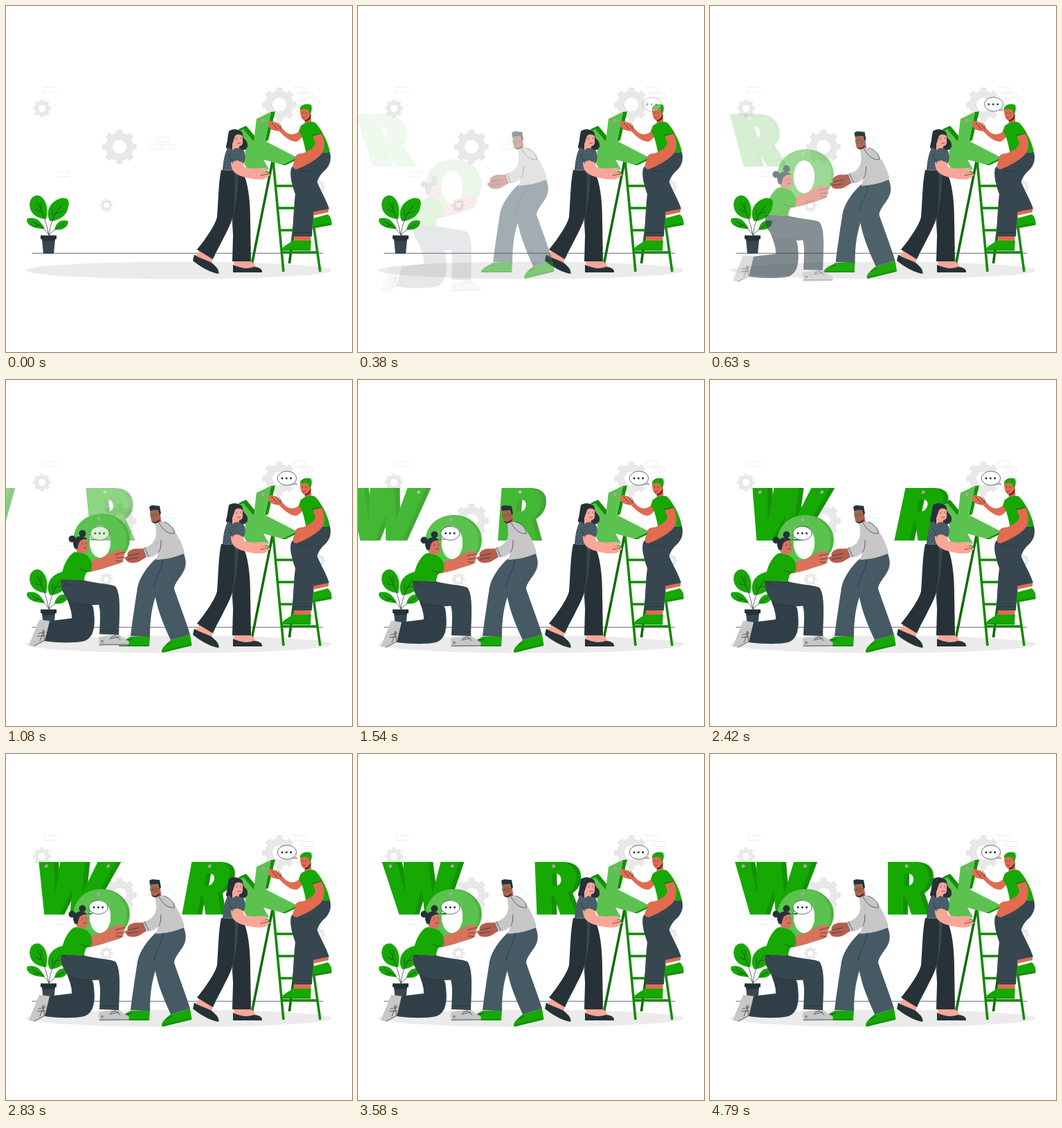
These frames come from a looping animation (500x500 px, 4830 ms). An HTML page:

```html
<!DOCTYPE html>
<html lang="en">
<head>
<meta charset="utf-8">
<title>Team building a word</title>
<style>
  html, body { margin: 0; width: 100%; height: 100%; overflow: hidden; background: #fff; }
  svg { display: block; width: 100vw; height: 100vh; }
  .green { fill: #16a803; } .deep { fill: #139204; } .light { fill: #5bc24f; }
  .ink { fill: #263238; } .slate { fill: #37474f; } .steel { fill: #455a64; }
  .grey { fill: #c7c7c7; } .bolt { fill: #a6a6a6; }
  .rose { fill: #f9a698; } .clay { fill: #e06b50; } .brown { fill: #b25f50; } .tan { fill: #d9725c; }
  .line { fill: none; stroke: #263238; stroke-width: .7; stroke-linecap: round; }
  .rail { fill: none; stroke: #148a08; stroke-width: 3.6; }
  .bubble { fill: #fff; stroke: #263238; stroke-width: .7; }
</style>
</head>
<body>
<svg viewBox="0 0 500 500">
  <defs>
    <pattern id="dots" width="5" height="6" patternUnits="userSpaceOnUse">
      <circle cx="1" cy="1.5" r=".45" fill="#aab8bf"/><circle cx="3.5" cy="4.5" r=".45" fill="#aab8bf"/>
    </pattern>
    <path id="w" d="M36 156H58L68 203 67 156H103L107 203 121 156H148L119 232H95L92 195 80 232H58Z"/>
    <path id="r" fill-rule="evenodd" d="M257 156H290C308 156 317 164 316 180 315 190 309 197 303 201L314 232H291L282 205H279V232H257ZM281 173V190H287C296 190 297 173 287 173Z"/>
    <path id="top" d="M322 204C317 208 314 222 313 237L331 238 341 229C347 226 347 213 343 208L333 205 327 208Z"/>
    <path id="hole" d="M136 211a15.500 24 0 0 0 0 48a15.500 24 0 0 0 0 -48Z"/>
  </defs>

  <g id="bricks" fill="none" stroke="#efefef"></g>
  <g id="gears" fill="none" stroke="#e8e8e8"></g>
  <ellipse cx="250" cy="382" rx="221" ry="12.5" fill="#ebebeb"/>
  <path class="line" d="M38 357.300H458"/>

  <g id="plant">
    <g class="green">
      <path d="M58 308C61 296 60 280 48 274 37 272 32 283 35 293 38 303 48 307 58 308Z"/>
      <path d="M64 311C57 301 61 285 76 279 88 275 93 280 90 290 88 304 76 310 64 311Z"/>
      <path d="M56 322C50 311 44 304 31 307 28 311 32 322 56 322Z"/>
      <path d="M70 323C72 313 80 307 90 311 90 319 82 325 70 323Z"/>
    </g>
    <path class="line" d="M62 331Q57 305 45 283M62 331Q65 305 80 288M62 331Q56 319 38 312M62 331Q70 322 84 315M53 298L43 294M51 293V284M67 304V295M70 300L82 297M48 317L40 318"/>
    <path class="ink" d="M50 331.500H73V337H50Z"/>
    <path class="slate" d="M52 337H71L69 358H54Z"/>
    <path class="ink" d="M52 336H71L70.500 339.500H52.500Z"/>
  </g>

  <g class="letter"><use href="#w" x="7" class="deep"/><use href="#w" class="green"/>
    <circle class="bolt" cx="48" cy="162" r="2.500"/><circle class="bolt" cx="137.500" cy="162" r="2.500"/></g>
  <g class="letter"><use href="#r" x="7" class="deep"/><use href="#r" class="green"/>
    <circle class="bolt" cx="284" cy="162" r="2.500"/></g>

  <g id="ladder">
    <path class="rail" style="stroke:#0c6d02" d="M385 225L355.500 372M428 228L409.500 372"/>
    <path class="rail" d="M389 260H420M392 292H424M396 324H440M398 356H449M386 223L401 384M432 228L454 384"/>
  </g>

  <g id="x">
    <path class="deep" d="M383 153L389 152.500 379 194 374 196ZM336 178L347 173 361 190 358 200ZM421 218V222L404 230 398 230ZM352 234H372L381 241H352Z"/>
    <path class="light" d="M362 163L383 153 374 195 421 219 400 229.500 372 222 380 236 352 240 344 228 346 210 338 180 343 178 358 196Z"/>
    <circle class="bolt" cx="371.500" cy="165.500" r="2.500"/>
  </g>

  <g id="woman">
    <path class="rose" d="M280 353L299 364 297 373 274 361ZM329 368H354L362 378H330Z"/>
    <path class="ink" d="M272 359.500C279 364 290 367 297 371 303 376 308 380 307.500 387 297 386 279 376 270 368ZM328 374C338 379 350 380 358 377 365 377 371 380 370 385H328Z"/>
    <path class="slate" d="M322 238L341 237 345 260 334 320 328 330Z"/>
    <path class="ink" d="M311 237L330 238C331 262 331 300 325 313 318 330 306 350 299 366L276 352C290 335 303 315 305 305 307 280 307 255 311 237Z"/>
    <path class="ink" d="M336 237H341C350 255 353 280 353 310L354 369H327L329 300C333 285 336 260 336 237Z"/>
    <path class="ink" d="M322 181C328 176 339 178 342 187 343 193 349 194 349 200 350 205 346 209 341 208 335 210 326 211 320 207 316 204 320 198 320 193Z"/>
    <path class="rose" d="M327 198H336L337 206 327 210Z"/>
    <path class="rose" d="M327 188C330 182 340 183 342 189L342 199C339 205 331 203 328 200Z"/>
    <path class="ink" d="M321 191C320 180 328 177 336 179 341 181 343 184 342 188 337 184 331 185 330 191L327 199C326 206 319 208 318 203 319 200 322 196 321 191Z"/>
    <path class="line" d="M333.500 191V192.500M339 190.500V192M335 198.500L339 198"/>
    <path class="rose" d="M345 233C358 236 366 234 376 234L377 239C366 243 354 241 344 238Z"/>
    <use href="#top" class="steel"/><use href="#top" fill="url(#dots)"/>
    <path class="rose" d="M325 226C325 237 330 243 343 247 355 250 365 252 374 250L382 244 378 240 364 241C352 241 344 236 342 226L334 223Z"/>
    <path class="line" d="M322 215L328 227M368 245L381 242"/>
  </g>

  <g id="climber">
    <path class="clay" d="M442 297L466 291V298L443 303Z"/>
    <path class="slate" d="M447 248C452 262 462 278 467 293L442 298 443 262Z"/>
    <path class="green" d="M443 307L465 301C471 306 471 313 470 316L443 321Z"/>
    <path class="deep" d="M443 318L470.500 313V316.500L443 321.500Z"/>
    <path class="clay" d="M416 331H440.500V340H416Z"/>
    <path class="green" d="M399 351C400 347 410 343 414 339L441 339 440 353H399Z"/>
    <path class="deep" d="M398.500 351.500H440.500V353.500H398.500Z"/>
    <path class="slate" d="M434 213L468 211C471 222 468 232 458 240 452 246 448 256 446 268L442 333H414C415 310 416 290 418 272 412 255 409 240 413 233 422 226 430 222 434 213Z"/>
    <path class="line" d="M444 238Q428 242 424 236M415 327.500H442"/>
    <path class="clay" d="M428 177C420 186 412 188 404 182L394 171C386 166 380 164 379 170 378 176 384 180 395 181 403 190 413 197 420 196 427 193 430 186 431 181Z"/>
    <path class="clay" d="M431 160L441 156V170L432 173Z"/>
    <path class="green" d="M426 173C432 168 440 166 446 168 456 177 466 198 468 211L434 214C431 200 429 188 423 181Z"/>
    <path class="clay" d="M443 186L456 184C462 198 462 208 453 217 445 224 433 231 420 236 412 235 414 229 418 222 417 217 420 213 428 213 438 210 446 204 447 198Z"/>
    <path class="green" d="M440 171C447 167 453 176 457 184L443 188Z"/>
    <path class="clay" d="M425 149L439 147 441 159C440 166 434 168 430 165 426 162 425 156 425 149Z"/>
    <path class="ink" d="M432 165C436 164 438 162 439 159L440.500 158C440 164 437 167 432 166.500Z"/>
    <path class="green" d="M425 150C424 143 434 140 441 143 443 149 441 154 439 157L437 150C433 148 429 149 425 150Z"/>
    <path class="line" d="M428.500 154V155.500M433.500 154V155.500M429 161L432 161M443 187L456 184M390 168L396 176M384 169L392 178M393 168L398 174 396 178"/>
  </g>

  <g id="hoodie">
    <path class="green" d="M163 383C166 377 174 375 180 371L208 370 207 385H163ZM225 391C226 386 232 381 238 376L266 368 268.500 383 226 394Z"/>
    <path class="deep" d="M163 383H207V385H163ZM225 391L268 381V384L226 394Z"/>
    <path class="steel" d="M217 258C205 268 193 285 190 300 187 320 183 345 180 370L208 371C208 345 211 325 219 305L245 275Z"/>
    <path class="steel" d="M217 258L257 251C262 265 260 273 252 284 246 292 243 297 243 302 251 325 260 348 266 368L238 376C226 350 216 325 214 300 213 285 216 270 217 258Z"/>
    <path class="line" d="M227 260C225 275 216 284 214 298M174 376L182 375M232 383L240 379"/>
    <path class="brown" d="M204 241C195 246 187 242 182 245 177 247 174 251 176 254L171 257 176 263C182 265 190 265 196 260L206 254Z"/>
    <path class="line" d="M177 254L192 251M176 259L190 257"/>
    <path class="brown" d="M213 202L223 200 226 208 217 211Z"/>
    <path class="grey" d="M216 207C226 202 238 207 243 217 250 227 256 240 258 250 247 256 231 259 217 260L220 249C216 254 209 257 203 256L198 243C210 240 217 232 217 222Z"/>
    <path class="line" d="M224 232C224 241 223 246 220 249M221 206C226 216 234 223 243 222 244 215 236 207 228 205M200 242L206 255"/>
    <path class="brown" d="M208 189L222 188 224 202C220 208 213 208 210 204Z"/>
    <path class="ink" d="M207 183L211 181 222 182 224 193 222 195 220 188 208 189ZM211 204C214 206 219 205 222 201L222 204C218 208 212 208 211 204Z"/>
    <g fill="none" stroke="#2c7a24" stroke-width=".7"><circle cx="210.500" cy="196" r="2.200"/><circle cx="216" cy="196" r="2.400"/><path d="M218 196L223 194"/></g>
  </g>

  <g id="kneeler">
    <g fill-rule="evenodd">
      <path fill="#4cb541" d="M139 195a40 36.500 0 0 1 0 73a40 36.500 0 0 1 0 -73ZM136 211a15.500 24 0 0 0 0 48a15.500 24 0 0 0 0 -48Z"/>
      <path class="light" d="M136 195.500a38.500 36 0 0 1 0 72a38.500 36 0 0 1 0 -72ZM136 211a15.500 24 0 0 0 0 48a15.500 24 0 0 0 0 -48Z"/>
    </g>
    <circle class="bolt" cx="134" cy="202" r="2.500"/>
    <path class="grey" d="M48 348L64 350 57 378 41 387 33 385ZM134 373L163 369C167 374 173 376 178 380L177 385 135 386Z"/>
    <path class="line" d="M47 368L57 366M46 372L56 371M49 379L54 366 56 378M151 374L158 371 165 377M150 376L163 373M41 386L56 378M135 384H177"/>
    <circle cx="54" cy="364.500" r="2" fill="#888"/><circle cx="139" cy="379.500" r="2" fill="#888"/>
    <path fill="#303f47" d="M80 298C88 318 96 335 95 346L63 350 56 379C78 382 100 382 113 379 128 374 130 355 126 330L110 300Z"/>
    <path class="slate" d="M80 289L113 291C130 296 150 296 158 300 165 308 165 330 163 370L135 369C136 350 137 335 134 326 118 328 100 325 90 318 82 312 78 300 80 289Z"/>
    <path class="line" d="M84 291C84 297 92 299 99 298M136 364H163M97 324C110 326 124 327 134 326"/>
    <path class="tan" d="M103 243L111 246 112 254 102 253Z"/>
    <path class="tan" d="M121 263C133 262 146 255 156 249 162 246 171 247 172 252 169 257 172 264 164 267 152 270 138 276 122 279Z"/>
    <path class="line" d="M158 254L171 251M159 259L171 258M159 263L169 264"/>
    <path class="green" d="M100 250C90 254 82 270 79 290L113 291C114 283 116 278 121 279 126 277 126 264 118 256 112 251 106 252 100 250Z"/>
    <path class="line" d="M106 274Q112 278 121 279"/>
    <path class="tan" d="M101 238C104 230 116 229 118 236L119 246C117 252 110 252 106 250Z"/>
    <path class="ink" d="M97 239C97 227 110 224 118 232 112 231 106 233 105 239L103 246 99 245Z"/>
    <circle class="ink" cx="95.500" cy="231.500" r="5"/><circle class="ink" cx="110.500" cy="223.500" r="5"/>
    <path class="line" d="M110.500 237.500V239M116 237V238.500M112 245L116 244"/>
  </g>

  <g class="bubble">
    <path d="M417 147.500L420.500 151 413 150.500"/>
    <ellipse cx="406" cy="142" rx="13.700" ry="10.200"/>
    <path d="M399 142h0M405.300 142h0M411.600 142h0" stroke-width="3" stroke-linecap="round"/>
  </g>
  <g class="bubble">
    <path d="M122 227L119 230.500 126 230"/>
    <ellipse cx="133.500" cy="221.500" rx="13.700" ry="10"/>
    <path d="M127 221.500h0M133.300 221.500h0M139.600 221.500h0" stroke-width="3" stroke-linecap="round"/>
  </g>
</svg>
<script>
const LOOP = 4830;
const $ = selector => document.querySelector(selector);
const letters = document.querySelectorAll('.letter');
const [bubbleA, bubbleB] = document.querySelectorAll('.bubble');

// Each gear: centre and outer radius; the dashed ring makes eight teeth.
$('#gears').innerHTML = [[52, 148, 13], [164, 203.5, 25], [145, 288, 9.5], [395, 142.5, 25], [452, 261, 9.5]]
  .map(([x, y, r]) => `
    <circle cx="${x}" cy="${y}" r="${r * .61}" stroke-width="${r * .42}"/>
    <circle cx="${x}" cy="${y}" r="${r * .89}" stroke-width="${r * .22}"
      pathLength="16" stroke-dasharray="1" stroke-dashoffset=".5"/>`).join('');

$('#bricks').innerHTML = [[55, 117], [74, 239], [219, 189], [208, 199], [227, 199], [416, 117], [426, 126]]
  .map(([x, y]) => `<path d="M${x} ${y + .5}h17v7h-17z"/>`).join('');

// cubic-bezier(.36, -.01, .5, 1.38): a soft start and a small overshoot.
function ease(p) {
  if (p <= 0) return 0;
  if (p >= 1) return 1;
  const curve = (u, a, b) => 3 * (1 - u) ** 2 * u * a + 3 * (1 - u) * u * u * b + u ** 3;
  let low = 0, high = 1;
  for (let i = 0; i < 24; i++) {
    const mid = (low + high) / 2;
    if (curve(mid, .36, .5) < p) low = mid; else high = mid;
  }
  return curve(low, -.01, 1.38);
}

function place(el, opacity, transform) {
  el.setAttribute('opacity', Math.min(1, Math.max(0, opacity)));
  el.setAttribute('transform', transform);
}

function slideIn(el, time, start, dx, dy) {
  const k = ease((time - start) / 1000);
  place(el, k, `translate(${dx * (1 - k)} ${dy * (1 - k)})`);
}

// Letters rush in leaning back, tip forward, then settle.
function rushIn(el, p) {
  let x = 0, skew, opacity = 1;
  if (p < .6) {
    opacity = ease(p / .6);
    x = -264 * (1 - opacity);
    skew = 20 - 30 * opacity;
  } else if (p < .8) {
    skew = -10 + 12 * ease((p - .6) / .2);
  } else {
    skew = 2 - 2 * ease((p - .8) / .2);
  }
  place(el, opacity, `translate(${x} 194) skewX(${skew}) translate(0 -194)`);
}

function draw(now) {
  const time = now % LOOP;
  letters.forEach(el => rushIn(el, time / LOOP));
  slideIn($('#hoodie'), time, 0, 30, 0);
  slideIn($('#kneeler'), time, 200, 0, 30);
  slideIn(bubbleA, time, 60, 30, 0);
  slideIn(bubbleB, time, 620, 6, 0);
  requestAnimationFrame(draw);
}
draw(performance.now());
</script>
</body>
</html>
```
